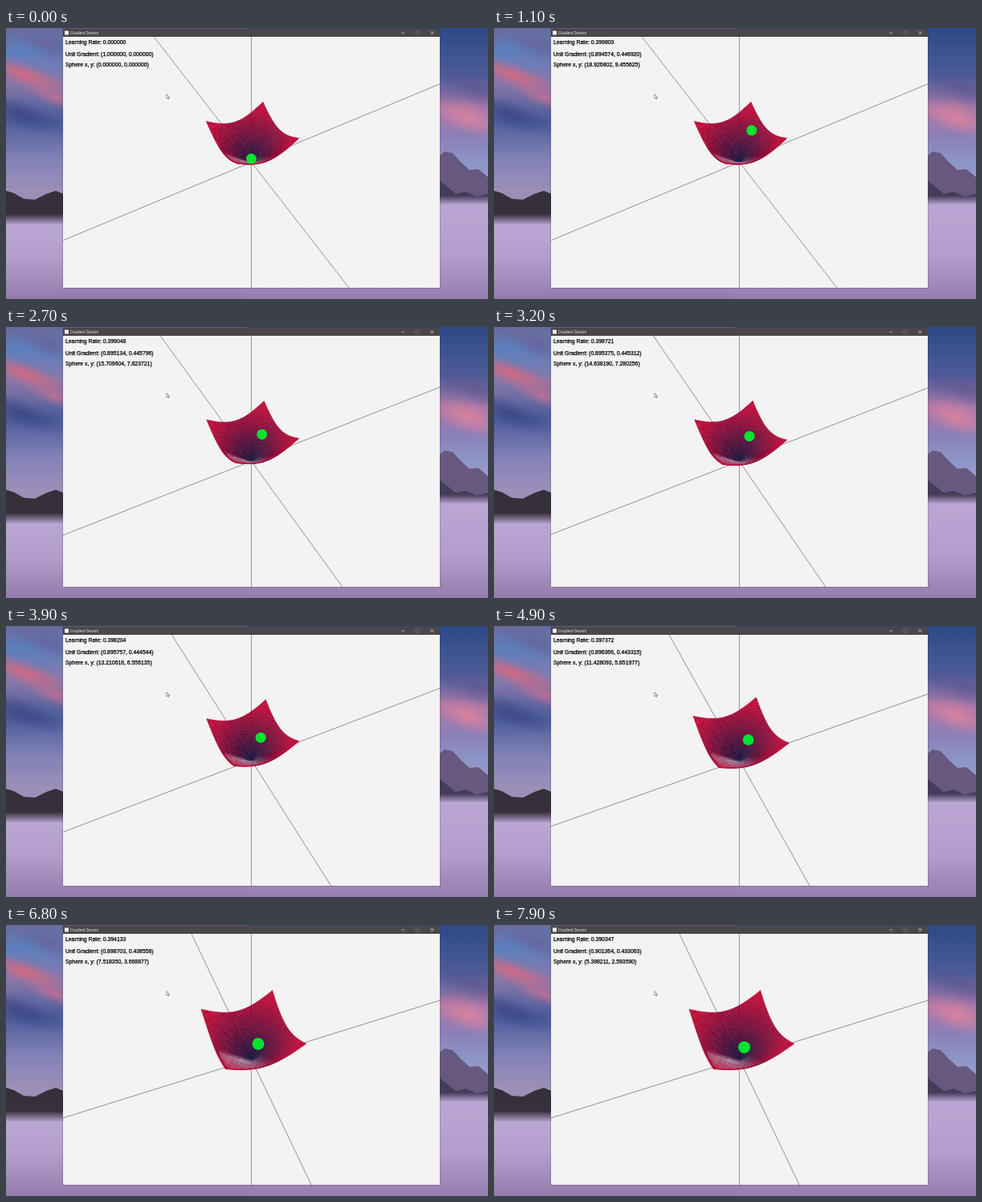
An HTML page with a canvas for the animation above (8 s loop, 600 by 338 pixels).

```html
<!DOCTYPE html>
<html lang="en">
<head>
<meta charset="utf-8">
<title>Gradient Decent</title>
<style>
  html, body { margin: 0; width: 100%; height: 100%; overflow: hidden; }
  canvas { display: block; }
</style>
</head>
<body>
<canvas id="stage" width="600" height="338"></canvas>
<script>
const W = 600, H = 338, LOOP = 8000;
const ctx = document.getElementById('stage').getContext('2d');
const view = { left: 71, top: 11, right: 540, bottom: 324, cx: 305.4, cy: 167.4 };
const HALF = 30, FOCAL = 375, BALL_RADIUS = 5;

// time, azimuth, elevation (degrees), camera distance
const cameraKeys = [
  [2100, 29.6, 47.05, 296],
  [2700, 28.1, 47.5, 296],
  [3900, 26.2, 51, 294.5],
  [4900, 23.9, 52.5, 282.5],
  [5900, 21.1, 54.1, 257.5]
];

const clamp = (v, lo, hi) => Math.min(hi, Math.max(lo, v));
const mix = (a, b, k) => a + (b - a) * k;
const noise = (i, j) => {
  const v = Math.sin(i * 127.1 + j * 311.7) * 43758.5453;
  return v - Math.floor(v);
};

function cameraAt(t) {
  const last = cameraKeys.length - 1;
  t = clamp(t, cameraKeys[0][0], cameraKeys[last][0]);
  let i = 0;
  while (i < last - 1 && t > cameraKeys[i + 1][0]) i++;
  const a = cameraKeys[i], b = cameraKeys[i + 1];
  const k = (t - a[0]) / (b[0] - a[0]);
  const [az, el, dist] = [1, 2, 3].map(n => mix(a[n], b[n], k));
  const rad = Math.PI / 180;
  return { sa: Math.sin(az * rad), ca: Math.cos(az * rad),
           se: Math.sin(el * rad), ce: Math.cos(el * rad), dist };
}

function project(cam, x, y, z) {
  const across = x * cam.ca + y * cam.sa;
  const front = y * cam.ca - x * cam.sa;
  const k = FOCAL / (cam.dist - front * cam.ce - z * cam.se);
  return [view.cx + across * k, view.cy + (front * cam.se - z * cam.ce) * k, k];
}

// Descent on the cone z = |(x, y)|; y is updated after x.
function descentAt(t) {
  const steps = Math.floor(t * 0.0055 - 2.15);
  if (steps < 0) return { x: 0, y: 0, gx: 1, gy: 0, rate: 0 };
  let x = 20, y = 10;
  for (let i = 0; i < steps; i++) {
    const r = Math.hypot(x, y), rate = x * y / (r * r);
    x -= rate * x / r;
    y -= rate * y / Math.hypot(x, y);
  }
  const r = Math.hypot(x, y), gx = x / r, gy = y / r;
  return { x, y, gx, gy, rate: gx * gy };
}

function polygon(c, points, fill) {
  c.beginPath();
  points.forEach(p => c.lineTo(p[0], p[1]));
  c.closePath();
  c.fillStyle = fill;
  c.fill();
}

function vertical(c, x, y, w, h, stops) {
  const g = c.createLinearGradient(0, y, 0, y + h);
  stops.forEach(([at, color]) => g.addColorStop(at, color));
  c.fillStyle = g;
  c.fillRect(x, y, w, h);
}

function cloud(c, x, y, rx, ry, rgb, alpha) {
  c.save();
  c.translate(x, y);
  c.rotate(0.35);
  c.scale(rx, ry);
  const g = c.createRadialGradient(0, 0, 0, 0, 0, 1);
  g.addColorStop(0, `rgba(${rgb},${alpha})`);
  g.addColorStop(1, `rgba(${rgb},0)`);
  c.fillStyle = g;
  c.fillRect(-1, -1, 2, 2);
  c.restore();
}

function paintBackdrop() {
  const layer = document.createElement('canvas');
  layer.width = W;
  layer.height = H;
  const c = layer.getContext('2d');
  vertical(c, 0, 0, 300, H, [[0, '#6a6a9c'], [0.08, '#5c7fbd'], [0.2, '#8878aa'],
    [0.34, '#4a5c9a'], [0.48, '#8281b8'], [0.6, '#9c8fb8'], [1, '#9a80b4']]);
  vertical(c, 300, 0, 300, H, [[0, '#2c4a86'], [0.18, '#4d5c98'], [0.3, '#a878a8'],
    [0.4, '#8b80b8'], [0.5, '#8d96c8'], [0.64, '#b0a0c8'], [1, '#9a80b4']]);
  cloud(c, 55, 22, 45, 18, '105,95,150', 0.8);
  cloud(c, 22, 58, 65, 15, '214,104,128', 0.95);
  cloud(c, 62, 86, 45, 13, '196,112,148', 0.85);
  cloud(c, 20, 108, 60, 18, '58,70,130', 0.85);
  cloud(c, 575, 112, 50, 20, '220,130,158', 0.95);
  cloud(c, 585, 76, 55, 18, '92,84,144', 0.7);
  polygon(c, [[0, 203], [10, 206], [22, 213], [36, 214], [50, 207], [62, 203],
    [72, 207], [72, 245], [0, 245]], '#372f3a');
  polygon(c, [[539, 160], [546, 154], [556, 156], [566, 167], [577, 177],
    [588, 176], [600, 186], [600, 221], [539, 221]], '#66587e');
  polygon(c, [[539, 190], [549, 198], [560, 207], [572, 204], [586, 210], [600, 207],
    [600, 221], [539, 221]], '#443c58');
  vertical(c, 0, 232, 72, 14, [[0, 'rgba(186,166,212,0)'], [1, '#baa6d4']]);
  vertical(c, 539, 209, 61, 12, [[0, 'rgba(186,166,212,0)'], [1, '#baa6d4']]);
  vertical(c, 0, 245, 300, 93, [[0, '#baa6d4'], [0.45, '#b49dcd'], [1, '#937bad']]);
  vertical(c, 300, 220, 300, 118, [[0, '#baa6d4'], [0.55, '#b49dcd'], [1, '#957daf']]);
  return layer;
}
const backdrop = paintBackdrop();

function line(x1, y1, x2, y2, color, width) {
  ctx.beginPath();
  ctx.moveTo(x1, y1);
  ctx.lineTo(x2, y2);
  ctx.strokeStyle = color;
  ctx.lineWidth = width;
  ctx.stroke();
}

function label(text, x, y, size, color, weight = 0) {
  ctx.font = `${size}px "Liberation Sans", sans-serif`;
  ctx.fillStyle = ctx.strokeStyle = color;
  ctx.fillText(text, x, y);
  if (weight) {
    ctx.lineWidth = weight;
    ctx.strokeText(text, x, y);
  }
}

function drawWindow() {
  ctx.fillStyle = 'rgba(60,45,75,0.45)';
  ctx.fillRect(70.5, 0.5, 470, 324);
  ctx.fillStyle = '#4b4648';
  ctx.fillRect(71, 1, 469, 10);
  ctx.fillStyle = '#f3f3f3';
  ctx.fillRect(view.left, view.top, 469, 313);
  ctx.fillRect(73, 3.5, 5, 5);
  label('Gradient Decent', 80, 7.8, 4.8, '#e4e2e2');
  line(492, 6, 496, 6, '#d0cecf', 0.7);
  ctx.strokeStyle = '#77727a';
  ctx.strokeRect(510, 4, 4, 4);
  line(528.5, 4, 532.5, 8, '#e4e2e2', 0.7);
  line(532.5, 4, 528.5, 8, '#e4e2e2', 0.7);
}

function drawAxes(cam) {
  const axis = (dx, dy) => line(view.cx - dx * 500, view.cy - dy * 500,
    view.cx + dx * 500, view.cy + dy * 500, '#505050', 0.6);
  axis(0, 1);
  axis(cam.ca, -cam.sa * cam.se);
  axis(cam.sa, cam.ca * cam.se);
}

function cellColor(x, y) {
  const r = Math.hypot(x, y);
  const depth = clamp(r / 36, 0, 1);
  const rim = Math.max(Math.abs(x), Math.abs(y)) > 28;
  const grain = noise(x, y);
  const facing = clamp(y / 7, 0, 1) * clamp((9 - x) / 18, 0, 1) * clamp(1.35 - r / 36, 0, 1);
  const light = rim ? 0 : facing * mix(0.4, 0.85, grain);
  const shade = (grain - 0.5) * (x < 0 ? 20 : 8);
  const channel = (dark, bright, pale) => Math.round(mix(mix(dark, bright, depth) + shade, pale, light));
  return `rgb(${channel(20, 186, 220)},${channel(18, 12, 200)},${channel(60, 56, 215)})`;
}

function drawCone(cam) {
  const vertex = (x, y) => project(cam, x, y, Math.hypot(x, y));
  ctx.lineWidth = 0.4;
  // back to front
  for (let x = HALF - 1; x >= -HALF; x--) {
    for (let y = -HALF; y < HALF; y++) {
      const color = cellColor(x + 0.5, y + 0.5);
      polygon(ctx, [vertex(x, y), vertex(x + 1, y), vertex(x + 1, y + 1), vertex(x, y + 1)], color);
      ctx.strokeStyle = color;
      ctx.stroke();
    }
  }
}

function drawBall(cam, s) {
  const [x, y, k] = project(cam, s.x, -s.y, Math.hypot(s.x, s.y) + BALL_RADIUS);
  ctx.beginPath();
  ctx.arc(x, y, BALL_RADIUS * k, 0, Math.PI * 2);
  ctx.fillStyle = '#00e430';
  ctx.fill();
}

function drawReadout(s) {
  const num = v => v.toFixed(6);
  const row = (text, y) => label(text, 74, y, 6.85, '#000', 0.25);
  row(`Learning Rate: ${num(s.rate)}`, 19.6);
  row(`Unit Gradient: (${num(s.gx)}, ${num(s.gy)})`, 35.3);
  row(`Sphere x, y: (${num(s.x)}, ${num(s.y)})`, 47.8);
}

function drawCursor() {
  polygon(ctx, [[200, 82.5], [200, 87.8], [201.2, 86.8], [202, 88.5],
    [202.8, 88.1], [202, 86.5], [203.6, 86.4]], '#fff');
  ctx.strokeStyle = '#333';
  ctx.lineWidth = 0.5;
  ctx.stroke();
}

function render(now) {
  const t = Math.floor(now % LOOP / 100) * 100;
  const cam = cameraAt(t), state = descentAt(t);
  ctx.lineJoin = 'round';
  ctx.drawImage(backdrop, 0, 0);
  drawWindow();
  ctx.save();
  ctx.beginPath();
  ctx.rect(view.left, view.top, view.right - view.left, view.bottom - view.top);
  ctx.clip();
  drawAxes(cam);
  drawCone(cam);
  drawBall(cam, state);
  drawReadout(state);
  drawCursor();
  ctx.restore();
}

const start = performance.now();
function tick() {
  render(performance.now() - start);
  requestAnimationFrame(tick);
}
tick();
</script>
</body>
</html>
```
